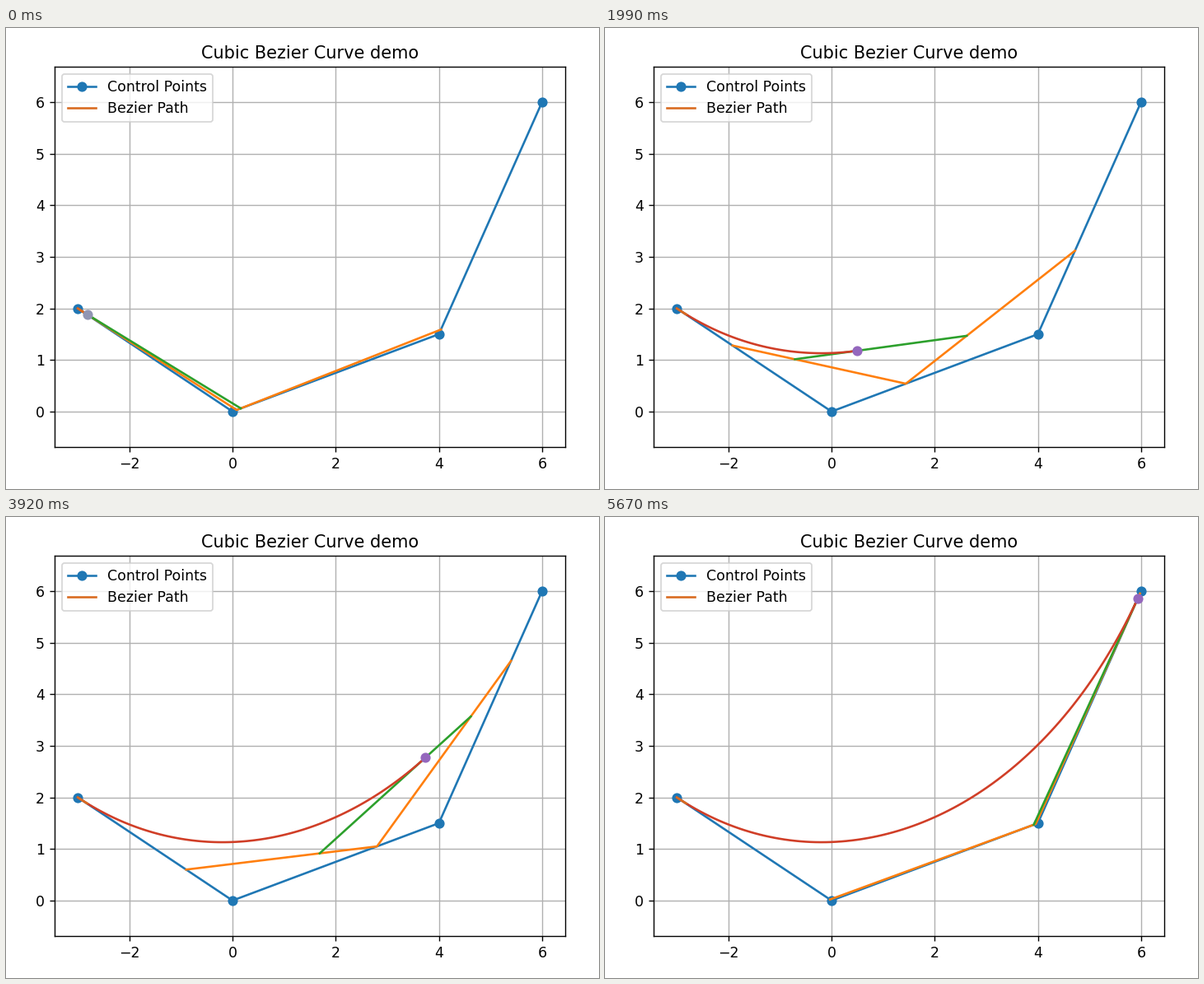
These frames come from a looping animation (720 px wide and 560 px high, 7130 ms). A matplotlib script:

```python
import numpy as np
import matplotlib.pyplot as plt
from matplotlib.animation import FuncAnimation

WIDTH, HEIGHT, DPI = 720, 560, 125
FRAMES, INTERVAL = 155, 46

CONTROL = np.array([(-3, 2), (0, 0), (4, 1.5), (6, 6)], float)
START_T = 0.02
OPENING_ORANGE, OPENING_PURPLE, PATH_RED = "#d96b20", "#9195b3", "#d03e27"

# The curve advances in discrete steps at a slightly uneven pace.
KEY_MS = [0, 800, 1390, 2600, 3920, 4720, 5670]
KEY_STEP = [0, 7, 11, 21, 31, 37, 45]
KEY_T = [START_T, 0.16, 0.25, 0.47, 0.70, 0.82, 0.99]


def progress(ms):
    """Curve parameter at a time, held between steps."""
    step = np.floor(np.interp(ms, KEY_MS, KEY_STEP))
    return round(float(np.interp(step, KEY_STEP, KEY_T)), 2)


def reduce_points(points, t):
    """One de Casteljau step."""
    return (1 - t) * points[:-1] + t * points[1:]


def bezier(t):
    t = t[:, None]
    a, b, c, d = CONTROL
    s = 1 - t
    return s**3 * a + 3 * s**2 * t * b + 3 * s * t**2 * c + t**3 * d


fig = plt.figure(figsize=(WIDTH / DPI, HEIGHT / DPI), dpi=DPI, facecolor="white")
ax = fig.add_axes([59 / WIDTH, 51 / HEIGHT, 620 / WIDTH, 462 / HEIGHT])
half_height = 9.9 * 462 / 620 / 2
ax.set(xlim=(-3.45, 6.45), ylim=(3 - half_height, 3 + half_height),
       xticks=range(-2, 7, 2), yticks=range(7))
ax.set_title("Cubic Bezier Curve demo")
ax.grid(True)

ax.plot(*CONTROL.T, "o-", color="C0", label="Control Points")
first_level, = ax.plot([], [], color="C1")
second_level, = ax.plot([], [], color="C2")
path, = ax.plot([], [], color=PATH_RED)
ax.plot(*bezier(np.linspace(0, START_T, 5)).T, color=OPENING_ORANGE,
        label="Bezier Path")
tip, = ax.plot([], [], "o")
ax.legend(loc="upper left")


def update(frame):
    t = progress((frame + 1) * INTERVAL)
    first = reduce_points(CONTROL, t)
    second = reduce_points(first, t)
    first_level.set_data(*first.T)
    second_level.set_data(*second.T)
    path.set_data(*bezier(np.linspace(0, t, 100)).T)
    tip.set_data(*reduce_points(second, t).T)
    tip.set_color(OPENING_PURPLE if t <= START_T else "C4")
    return first_level, second_level, path, tip


anim = FuncAnimation(fig, update, frames=FRAMES, interval=INTERVAL,
                     repeat=True, repeat_delay=0, blit=False)
plt.show()
```
